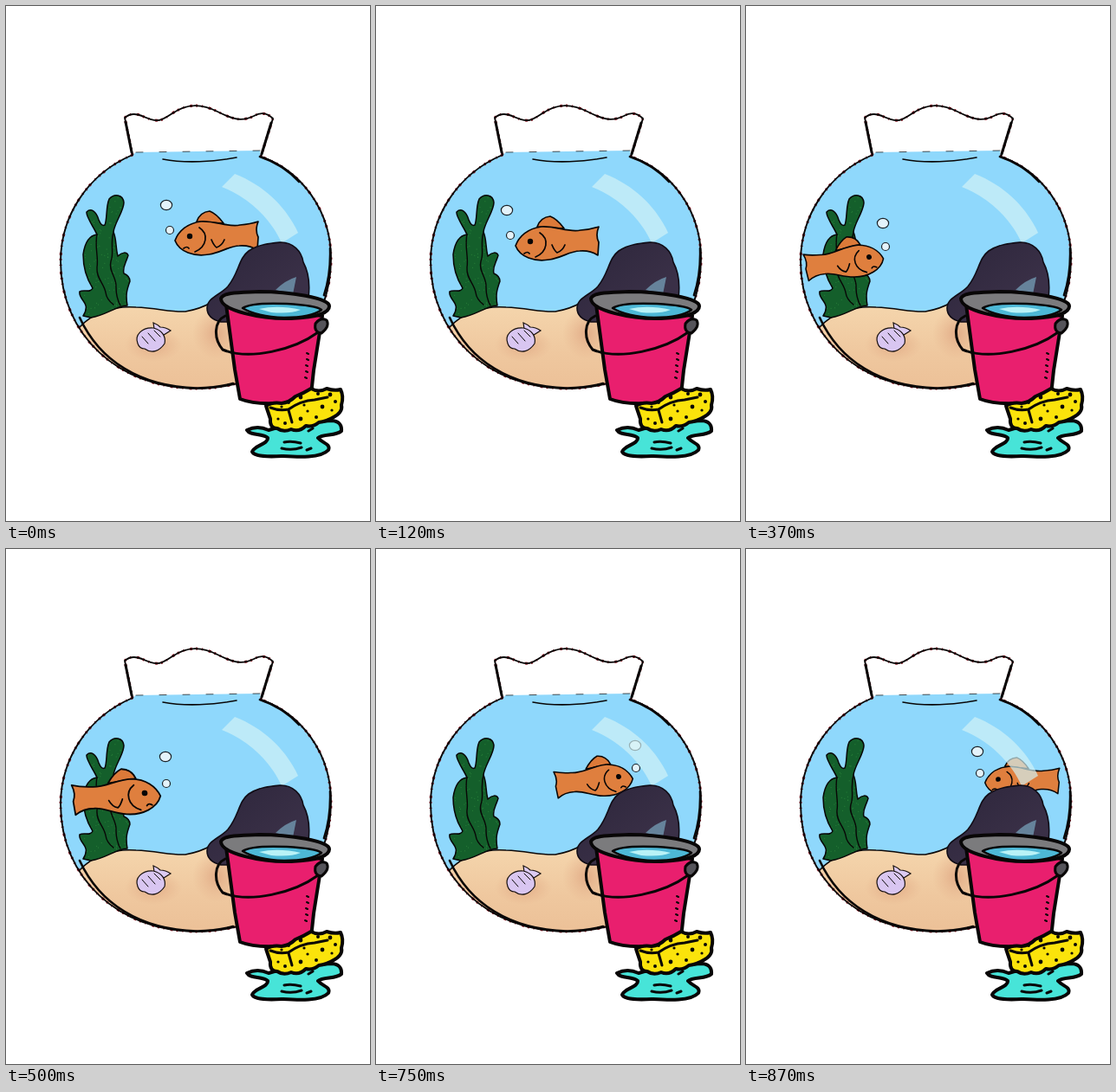
Animation of 420 by 595 pixels, one loop 1 s. Source, as an HTML page:

```html
<!DOCTYPE html>
<html lang="en">
<head>
<meta charset="utf-8">
<title>Goldfish bowl</title>
<style>
html, body { margin: 0; width: 100%; height: 100%; overflow: hidden; background: #fff; }
svg { display: block; width: 100vw; height: 100vh; }
.ink { fill: none; stroke: #080606; stroke-linecap: round; stroke-linejoin: round; }
.edge { fill: none; stroke: #8c1420; stroke-dasharray: 2 5 1 7 3 4; }
</style>
</head>
<body>
<svg viewBox="0 0 420 595">
  <defs>
    <path id="bowl" d="M146 172C92 195 63 245 63 295C63 380 130 442 220 442C318 442 375 370 375 292C375 235 340 190 294 174"/>
    <path id="rim" d="M146 172L137 129Q145 122 157 127C176 136 180 132 192 124C210 112 226 113 244 122C262 131 272 134 286 127Q298 120 308 130L294 174"/>
    <path id="plant" d="M89 358C99 342 83 340 85 330C90 327 97 332 100 326C91 312 89 298 89 287C91 273 97 265 105 264C101 255 92 243 93 238C98 233 104 237 107 247Q110 255 114 253C117 246 115 232 119 223C125 216 135 218 136 227C136 237 125 251 124 261C128 271 126 277 129 289C134 284 139 284 141 288C138 298 134 302 136 309Q143 312 143 318C139 329 138 334 140 346C126 347 116 357 98 360Z"/>
    <clipPath id="inBowl"><path d="M146 172L150 169L293 167L294 174C340 190 375 235 375 292C375 370 318 442 220 442C130 442 63 380 63 295C63 245 92 195 146 172Z"/></clipPath>
    <clipPath id="inPlant"><use href="#plant"/></clipPath>
    <linearGradient id="sand" x1="0" y1="0" x2="0" y2="1">
      <stop offset="0" stop-color="#f5d6ad"/><stop offset=".55" stop-color="#efc89f"/><stop offset="1" stop-color="#ecc097"/>
    </linearGradient>
    <radialGradient id="shade"><stop offset="0" stop-color="#d99a78" stop-opacity=".65"/><stop offset="1" stop-color="#e0a883" stop-opacity="0"/></radialGradient>
    <linearGradient id="rock" x1="0" y1="0" x2="1" y2="1">
      <stop offset=".3" stop-color="#322a40"/><stop offset=".7" stop-color="#3a3047"/>
    </linearGradient>
  </defs>

  <g clip-path="url(#inBowl)">
    <rect x="60" y="160" width="320" height="290" fill="#8fd8fc"/>
    <path d="M84 372C100 354 125 346 150 348C175 349 190 354 207 353Q224 350 236 343L360 370V445H100Z" fill="url(#sand)" stroke="#0b0808" stroke-width="1.5"/>
    <ellipse cx="170" cy="391" rx="33" ry="20" fill="url(#shade)"/>
    <ellipse cx="243" cy="378" rx="28" ry="30" fill="url(#shade)"/>
  </g>

  <use href="#plant" fill="#145f2b"/>
  <g id="specks" clip-path="url(#inPlant)" fill="#2d8a3c"></g>
  <use href="#plant" class="ink" stroke-width="1.5"/>
  <path class="ink" stroke-width="1.4" d="M105 264C102 278 107 290 105 302C104 315 113 320 115 331Q116 339 124 345M124 261C120 275 125 285 121 295C118 307 128 313 127 325Q127 337 132 346"/>

  <g stroke="#17110f" stroke-width="1.2">
    <path d="M171 373L170 366Q175 368 178 371Q184 371 190 375L182 380Z" fill="#dccaf2"/>
    <path d="M152 390C148 380 157 371 170 372C179 374 185 381 183 390C177 399 168 402 160 396Q154 396 152 390Z" fill="#d9c6f1"/>
    <path class="ink" d="M157 382L164 390M164 378L172 387M171 375L178 382" stroke-width="1"/>
  </g>

  <g id="fish" class="ink" stroke-width="1.7">
    <path fill="#dc7a39" d="M8 -17Q12 -28 23 -29Q31 -26 39 -15Z"/>
    <path fill="#df7f3e" d="M-17 5C-13 -6 -3 -15 13 -17C30 -18 44 -10 58 -13Q70 -14 79 -17Q75 -7 79 1L78 16Q69 10 57 11C46 11 36 19 22 21C5 24 -12 18 -17 5Z"/>
    <path d="M11 -10C22 -3 20 12 6 18M25 4Q28 11 31 13Q37 11 40 4M-7 14Q-3 11 -1 14"/>
    <circle r="3.2" fill="#080606" stroke="none"/>
  </g>
  <g fill="#e4f3fb" stroke="#1b2228" stroke-width="1.2">
    <ellipse id="big" rx="6.6" ry="5.6"/>
    <ellipse id="small" rx="4.5" ry="4.5"/>
  </g>

  <path d="M264 194C300 208 325 235 337 262L318 274C306 246 280 221 249 209Z" fill="#d3f3f6" fill-opacity=".68"/>

  <path d="M232 349C232 337 247 334 256 324C269 308 268 292 280 283C292 275 306 274 317 273C331 273 341 283 343 296C349 307 351 320 349 337L330 365H248Q232 361 232 349Z" fill="url(#rock)" stroke="#100c16" stroke-width="1.6"/>
  <path d="M311 328Q322 317 335 313L331 333Z" fill="#66839b"/>

  <use href="#bowl" class="edge" stroke-width="3"/>
  <use href="#bowl" class="ink" stroke-width="1.9"/>
  <path class="ink" stroke-width="2.6" d="M85 360C108 410 155 440 220 441.500Q244 441 262 436M293 174Q320 183 338 203M374 280Q375 310 367 334"/>
  <use href="#rim" class="edge" stroke-width="3"/>
  <use href="#rim" class="ink" stroke-width="1.9"/>
  <path class="ink" stroke-width="3" d="M138 134L145 169M306 135L295 171"/>
  <path class="ink" stroke-width="1.6" d="M181 177C207 182 240 180 266 175"/>
  <path class="ink" stroke-width=".7" stroke-dasharray="8 19" d="M150 169L293 167"/>

  <g class="ink" stroke-width="4">
    <path d="M278 490Q290 484 303 490L330 482L376 479Q388 480 387 491C381 497 366 494 360 499C365 505 375 506 372 513C363 523 335 521 318 520C302 521 286 520 284 515C286 508 303 506 302 499C296 493 282 497 278 490Z" fill="#47e4d8"/>
    <path d="M321 504Q329 502 340 505M318 511Q330 514 341 510M347 513L352 511M349 491L354 488" stroke-width="3"/>
  </g>

  <g class="ink" stroke-width="4">
    <path d="M254 345L264 420L270 454Q285 460 310 459Q338 460 352 449L355 421L365 358Z" fill="#e91f6e"/>
    <path d="M248 338C251 330 272 331 292 330C326 330 374 337 373 347C373 356 354 360 329 361C295 362 248 352 248 338Z" fill="#7b7b7d"/>
    <path d="M273 349C280 344 300 343 324 344Q358 346 364 351C355 358 338 360 321 360Q289 359 273 349Z" fill="#4db8d6" stroke-width="2.5"/>
    <path d="M292 350Q314 345 340 351Q328 356 306 354Z" fill="#b9f2f7" stroke="none"/>
    <path d="M253 358C240 364 239 384 250 397C281 410 333 397 360 377" stroke-width="3"/>
    <path d="M357 367Q363 359 370 363Q374 370 364 378Q355 377 357 367Z" fill="#55545a" stroke-width="3"/>
    <path d="M347 401l2 1M347 408l2 1M346 415l2 1M346 422l2 1M345 429l2 1" stroke-width="2"/>
  </g>

  <g class="ink" stroke-width="4">
    <path d="M300 462Q308 457 318 459Q327 458 334 451Q344 447 352 442Q361 447 370 442Q379 445 386 443Q390 451 387 461Q389 469 378 475Q370 480 361 481Q354 487 346 485Q338 493 329 489Q320 493 313 488Q304 488 305 477Z" fill="#fbe30b"/>
    <path d="M305 464Q315 468 326 466Q340 456 356 455L371 452M326 467L330 481" stroke-width="3"/>
  </g>
  <g id="holes" fill="#080606"></g>
</svg>
<script>
const $ = id => document.getElementById(id);
const starts = [0, 120, 250, 370, 500, 620, 750, 870];
const loop = 1000;

// eye x, eye y, facing (1 = left), scale, tilt, then both bubbles
const poses = [
  [212, 266, 1, 1, 0, 185, 230, 189, 259],
  [178, 272, 1, 1, 0, 151, 236, 155, 265],
  [144, 278, 1, 1, 0, 117, 243, 122, 271],
  [142, 290, -1, .94, 10, 158, 251, 161, 278],
  [160, 282, -1, 1.05, 6, 184, 240, 185, 271],
  [216, 270, -1, .94, 10, 235, 233, 236, 260],
  [280, 263, -1, .93, 8, 299, 227, 300, 253],
  [291, 266, 1, .89, 2, 267, 234, 270, 259]
];

function dot(parent, x, y, r) {
  const c = document.createElementNS("http://www.w3.org/2000/svg", "circle");
  c.setAttribute("cx", x);
  c.setAttribute("cy", y);
  c.setAttribute("r", r);
  parent.append(c);
}

let seed = 7;
const random = () => (seed = seed * 16807 % 2147483647) / 2147483647;
for (let i = 0; i < 190; i++) {
  dot($("specks"), 84 + random() * 60, 218 + random() * 142, .5);
}

[[318, 463], [326, 458], [340, 452], [344, 461], [360, 448], [374, 449],
 [314, 477], [322, 482], [340, 477], [348, 468], [358, 475], [365, 463], [376, 467], [380, 457]]
  .forEach(([x, y], i) => dot($("holes"), x, y, 1.6 + i % 3 * .4));

function place(id, x, y) {
  $(id).setAttribute("transform", `translate(${x} ${y})`);
}

function draw(now) {
  const t = now % loop;
  const pose = poses[starts.findLastIndex(s => s <= t)];
  const [x, y, facing, size, tilt, bx, by, sx, sy] = pose;
  $("fish").setAttribute("transform",
    `translate(${x} ${y}) scale(${facing * size} ${size}) rotate(${tilt})`);
  place("big", bx, by);
  place("small", sx, sy);
}

let origin;
function tick(now) {
  origin ??= now;
  draw(Math.max(0, now - origin));
  requestAnimationFrame(tick);
}
draw(0);
requestAnimationFrame(tick);
</script>
</body>
</html>
```
